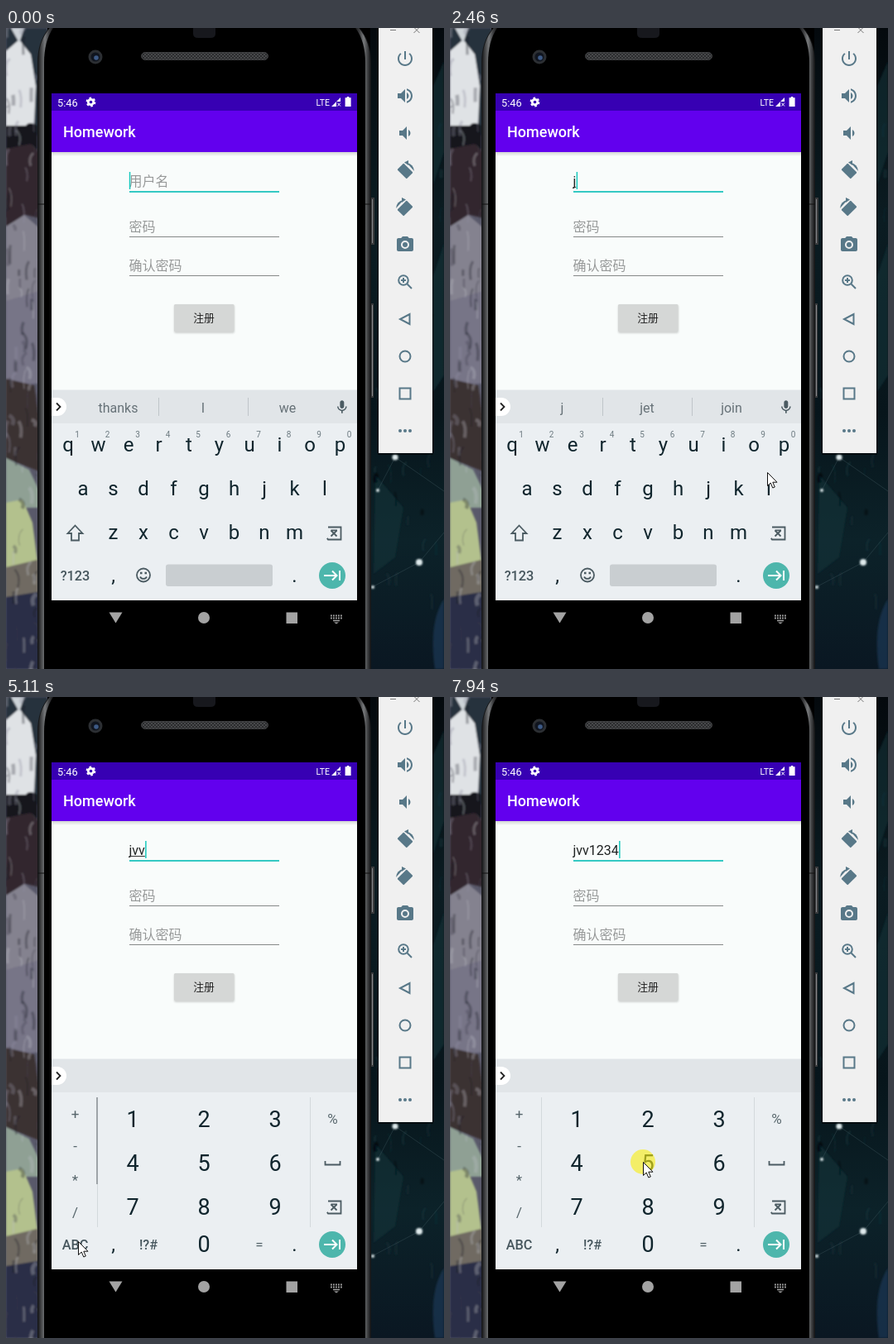
Write an HTML page that moves like this. It is 529 px wide and 775 px high and loops after 8000 ms.

```html
<!DOCTYPE html>
<html lang="zh">
<head>
<meta charset="utf-8">
<title>Homework</title>
<style>
html, body { margin: 0; width: 100%; height: 100%; overflow: hidden; background: #000; }
svg { display: block; }
text { font-family: Roboto, "Noto Sans CJK SC", "Noto Sans CJK", sans-serif; }
.mid text, text.mid { text-anchor: middle; }
.hint { font-size: 16px; fill: #979999; }
.key { font-size: 24px; fill: #10252d; }
.num { font-size: 27px; fill: #10252d; }
.sup { font-size: 10px; fill: #6c7a80; }
.mod { font-size: 16.3px; font-weight: 500; fill: #46565d; }
.sym { font-size: 17px; fill: #56656b; }
.sug { font-size: 16px; fill: #667177; }
.line { fill: none; stroke: #4b5b62; stroke-width: 1.8; }
.tool { fill: #587888; }
.tool .o { fill: none; stroke: #587888; stroke-width: 2; }
</style>
</head>
<body>
<svg width="529" height="775" viewBox="0 0 529 775">
  <defs>
    <linearGradient id="rim">
      <stop offset="0" stop-color="#1b1c1e"/><stop offset=".4" stop-color="#77797b"/>
      <stop offset=".65" stop-color="#3c3d3f"/><stop offset="1" stop-color="#0b0b0c"/>
    </linearGradient>
    <linearGradient id="night" x2="0" y2="1">
      <stop offset="0" stop-color="#04090d"/><stop offset=".3" stop-color="#0b1c22"/>
      <stop offset=".6" stop-color="#07151b"/><stop offset=".8" stop-color="#0c2229"/>
      <stop offset="1" stop-color="#0a1722"/>
    </linearGradient>
    <linearGradient id="fade" x2="0" y2="1">
      <stop offset="0" stop-opacity=".16"/><stop offset="1" stop-opacity="0"/>
    </linearGradient>
    <pattern id="mesh" width="4" height="4" patternUnits="userSpaceOnUse">
      <path fill="#2b2c2e" d="M0 0h4v4H0z"/><path stroke="#48494b" d="M0 0 4 4M4 0 0 4"/>
    </pattern>
    <filter id="soft"><feGaussianBlur stdDeviation="1"/></filter>
    <clipPath id="leftClip"><path d="M0 0h50v775H0z"/></clipPath>
    <clipPath id="screenClip"><path d="M55 79h369v613H55z"/></clipPath>
    <g id="erase">
      <path class="line" d="M-5-7.5H10.5V7.5H-5L-10.5 0ZM-1.5-3.7 6-3.7" stroke-dasharray="48"/>
      <path class="line" d="M-1.5-3.5 5.5 3.5M5.5-3.5-1.5 3.5"/>
    </g>
    <g id="enter">
      <circle r="16" fill="#4db6ac"/>
      <path fill="none" stroke="#fff" stroke-width="2" d="M-10 0H5M0-5.5 5.5 0 0 5.5M9-6V6"/>
    </g>
    <g id="turn">
      <rect class="o" x="-5.5" y="-8" width="11" height="16" rx="1" transform="rotate(-45)"/>
      <path class="o" d="M2-10A10.5 10.5 0 0 1 11 0" stroke-width="1.7"/>
      <path d="M-1-10.500 4-13V-7Z"/>
    </g>
  </defs>

  <!-- wallpaper -->
  <g clip-path="url(#leftClip)">
    <path fill="#59596a" d="M0 0h50v775H0z"/>
    <g id="paint" filter="url(#soft)">
      <path fill="#26303c" d="M0 0H50V130H0Z"/>
      <path fill="#dfe2e5" d="M0 28 16 14 30 32 36 70 34 118 0 122Z"/>
      <path fill="#cdd3d8" d="M6 0H22L16 18Z"/>
      <path fill="#15171d" d="M0 118H24Q28 112 38 118V150L20 165 0 150Z"/>
      <path fill="#33262d" d="M0 146 30 140 50 160V232L24 226 0 240Z"/>
      <path fill="#84828f" d="M0 240 22 226 50 250V335L0 330Z"/>
      <path fill="#777487" d="M0 330 40 318 50 430H0Z"/>
      <path fill="#3b3031" d="M0 424 34 432 50 540 0 520Z"/>
      <path fill="#8fa094" d="M0 520 28 534 50 580H0Z"/>
      <path fill="#b3c18d" d="M0 574 20 570 32 598 38 645 0 655Z"/>
      <path fill="#706a62" d="M0 652 50 640V696H0Z"/>
      <path fill="#2b2e46" d="M0 688 50 680V775H0Z"/>
    </g>
  </g>
  <path fill="url(#night)" d="M440 0h89v775h-89z"/>
  <g id="sky" filter="url(#soft)">
    <path fill="#12343b" opacity=".55" d="M516 70 529 40V150L516 190ZM516 300 529 260V420L516 440ZM446 540 480 580 470 640 444 660Z"/>
    <path fill="#1c3550" opacity=".8" d="M529 690Q510 720 518 775H529Z"/>
  </g>
  <path fill="none" stroke="#3c555c" stroke-width=".7" opacity=".6" d="M449 559 470 519 529 560M444 675 499 646 529 610"/>
  <g fill="#dfeaec" filter="url(#soft)">
    <circle cx="470" cy="519" r="3.600"/><circle cx="499" cy="646" r="4"/>
    <circle cx="449" cy="559" r="2"/><circle cx="443" cy="676" r="2"/>
  </g>

  <!-- phone -->
  <path fill="#393a3c" d="M440 205h5v57h-5zM440 333h4v114h-4z"/>
  <path stroke="#85878a" d="M442.500 207v53M442.500 335v110"/>
  <path fill="#161718" d="M38 775V42Q38 16 52 0H427Q441 16 441 42V775Z"/>
  <path fill="url(#rim)" d="M39 775V42Q39 16 53 0h6Q47 16 47 42V775Z"/>
  <path fill="url(#rim)" transform="matrix(-1 0 0 1 479 0)" d="M39 775V42Q39 16 53 0h6Q47 16 47 42V775Z"/>
  <path fill="#000" d="M46 775V42Q46 16 57 0H422Q434 16 434 42V775Z"/>
  <path stroke="#111" d="M38 213h8M434 213h7"/>
  <path fill="#17181d" d="M226 0h27v7q0 5-6 5h-15q-6 0-6-5Z"/>
  <circle cx="108" cy="35" r="8.500" fill="#2c2f33"/>
  <circle cx="108" cy="35" r="5.500" fill="#10151f"/>
  <circle cx="109" cy="36" r="2.800" fill="#3d5a86"/>
  <rect x="163.500" y="29.500" width="153" height="9" rx="4.500" fill="url(#mesh)" stroke="#3d3e40"/>

  <!-- app -->
  <g clip-path="url(#screenClip)">
    <path fill="#f9fcfb" d="M55 79h369v613H55z"/>
    <path fill="#3700b3" d="M55 79h369v21H55z"/>
    <path fill="#6200ee" d="M55 100h369v50H55z"/>
    <path fill="url(#fade)" d="M55 150h369v5H55z"/>
    <g fill="#fff">
      <text x="62" y="94.500" font-size="12.800">5:46</text>
      <text x="374.500" y="93.500" font-size="10.500">LTE</text>
      <text x="69" y="132" font-size="18" font-weight="500">Homework</text>
      <path d="M411.800 83h2.500v1.300h2.300V95h-7V84.300h2.200zM404 84V95H393Z"/>
      <path d="M399 89h6v6h-6z" fill="#3700b3"/>
      <path d="M400.300 90.500 404 94.500M404 90.500 400.300 94.500" stroke="#fff"/>
    </g>
    <g transform="translate(102.500 89.500)" fill="none" stroke="#fff">
      <circle r="3.200" stroke-width="2.700"/>
      <circle r="5" stroke-width="1.800" stroke-dasharray="2.618"/>
    </g>

    <text id="hint" class="hint" x="148.500" y="191">用户名</text>
    <text id="typed" x="148.500" y="190.500" font-size="16" fill="#202323"></text>
    <path id="under" stroke="#333" stroke-width="1"/>
    <rect id="caret" y="174" width="1.500" height="21" fill="#17c9bd"/>
    <path fill="#35c9c3" d="M149 197h181v2H149z"/>
    <text class="hint" x="148.500" y="245.500">密码</text>
    <text class="hint" x="148.500" y="293">确认密码</text>
    <path stroke="#858888" d="M149 252.500H330M149 299.500H330"/>
    <rect x="203" y="335" width="73" height="34" rx="2" opacity=".16" filter="url(#soft)"/>
    <rect x="203" y="334" width="72.500" height="33" rx="1.500" fill="#d5d7d6"/>
    <text class="mid" x="239" y="355" font-size="12.800" fill="#222">注册</text>

    <path fill="#e1e5e8" d="M55 438h369v40H55z"/>
    <path fill="#eef1f2" d="M55 437h369v1H55z"/>
    <path fill="#ebeff2" d="M55 478h369v214H55z"/>
    <path fill="#fff" d="M55 447h7a11 11 0 0 1 0 22h-7z"/>
    <path fill="none" stroke="#222" stroke-width="1.800" d="M61 453.500 65.500 458 61 462.500"/>
    <g id="sugs" class="mid"></g>
    <path id="bars" stroke="#bfc5c9" d="M184.500 447v22M292.500 447v22"/>

    <g id="letters" class="mid">
      <path fill="#4b5b62" transform="translate(396 448.500) scale(.82)" d="M12 14c1.660 0 3-1.340 3-3V5c0-1.660-1.340-3-3-3S9 3.340 9 5v6c0 1.660 1.340 3 3 3zm5.300-3c0 3-2.540 5.100-5.300 5.100S6.700 14 6.700 11H5c0 3.410 2.720 6.230 6 6.720V21h2v-3.280c3.280-.48 6-3.300 6-6.720h-1.700z"/>
      <path class="line" d="M83.500 601.500 92.500 611H88V619.500H79V611H74.500Z"/>
      <use href="#erase" x="394" y="611"/>
      <g class="line" transform="translate(166 661.500)" stroke-width="1.600">
        <circle r="8"/><path d="M-4 2A4.500 4.500 0 0 0 4 2"/>
        <path d="M-4-2.500h2.500M1.500-2.500H4" stroke-width="2.500"/>
      </g>
      <rect x="193" y="648.500" width="129" height="26.500" rx="3" fill="#c9ced1"/>
    </g>
    <g id="digits" class="mid">
      <rect id="press" width="86" height="52" fill="#d6dce0"/>
      <path stroke="#d3d9dc" d="M110.500 484V641M367.500 484V641"/>
      <path id="scroll" fill="#9ea4a8" d="M109 484h2v105h-2z"/>
      <path class="line" d="M385.500 561v4.500H403.500V561"/>
      <use href="#erase" x="394" y="617"/>
    </g>
    <use href="#enter" x="394" y="662"/>
  </g>

  <g fill="#a3a3a3">
    <path d="M124.500 706.500H140.500L132.500 719.500Z"/><circle cx="239" cy="713" r="7"/>
    <path d="M338.500 706.500h13.500v13.500h-13.500z"/>
    <path d="M396 718.500h6l-3 2z"/>
  </g>
  <path stroke="#a3a3a3" stroke-width="1.800" stroke-dasharray="1.800 1.200" d="M392 710.500h14M392 713.500h14"/>
  <path stroke="#a3a3a3" stroke-width="1.500" d="M395 716.500h8"/>

  <!-- emulator tools -->
  <path fill="#000" opacity=".5" d="M449 0h67v516h-67z"/>
  <path fill="#f0f0f0" d="M450 0h65v514h-65z"/>
  <path fill="none" stroke="#777" d="M464 2.500h7M492.500-1 499.500 6M499.500-1 492.500 6"/>
  <g class="tool" transform="translate(482 0)">
    <path transform="translate(-12 25)" d="M13 3h-2v10h2V3zm4.830 2.170l-1.420 1.420C17.990 7.860 19 9.810 19 12c0 3.870-3.130 7-7 7s-7-3.130-7-7c0-2.190 1.010-4.140 2.580-5.420L6.170 5.170C4.230 6.820 3 9.260 3 12c0 4.970 4.030 9 9 9s9-4.030 9-9c0-2.740-1.230-5.180-3.170-6.830z"/>
    <path transform="translate(-12 70)" d="M3 9v6h4l5 5V4L7 9H3zm13.500 3c0-1.770-1.020-3.290-2.500-4.030v8.050c1.480-.73 2.500-2.250 2.500-4.020zM14 3.230v2.060c2.890.86 5 3.540 5 6.710s-2.110 5.850-5 6.710v2.060c4.010-.91 7-4.490 7-8.770s-2.990-7.860-7-8.770z"/>
    <path transform="translate(-12 115)" d="M18.500 12c0-1.770-1.020-3.290-2.500-4.030v8.050c1.480-.73 2.500-2.250 2.500-4.020zM5 9v6h4l5 5V4L9 9H5z"/>
    <use href="#turn" y="173"/>
    <use href="#turn" y="218" transform="scale(-1 1)"/>
    <path transform="translate(-12 250)" fill-rule="evenodd" d="M9 2L7.170 4H4c-1.100 0-2 .9-2 2v12c0 1.100.9 2 2 2h16c1.100 0 2-.9 2-2V6c0-1.100-.9-2-2-2h-3.170L15 2H9zm3 15a5 5 0 0 1 0-10 5 5 0 0 1 0 10z"/>
    <circle cy="262" r="3"/>
    <circle class="o" cx="-2" cy="305" r="5.800"/>
    <path class="o" d="M2.500 309.500 8 315"/>
    <path class="o" stroke-width="1.300" d="M-5 305H1M-2 302V308"/>
    <path class="o" stroke-width="1.700" d="M5.500 346V358L-6 352Z"/>
    <circle class="o" cy="397" r="6.500"/>
    <path class="o" d="M-6.500 435.500h13v13h-13z"/>
    <circle cx="-6" cy="487" r="2"/><circle cy="487" r="2"/><circle cx="6" cy="487" r="2"/>
  </g>

  <g id="mouse">
    <circle id="click" r="15" fill="#f8ee14" opacity=".62"/>
    <path fill="#fff" stroke="#111" d="M.5.500V16.500L4.200 13 6.800 19 9.300 18 6.800 12.200H12Z"/>
  </g>
</svg>
<script>
const $ = id => document.getElementById(id);
const LOOP = 8000;

function add(parent, tag, attrs, text) {
  const el = document.createElementNS('http://www.w3.org/2000/svg', tag);
  for (const k in attrs) el.setAttribute(k, attrs[k]);
  if (text) el.textContent = text;
  return parent.appendChild(el);
}
const label = (parent, cls, x, y, text) => add(parent, 'text', { class: cls, x, y }, text);

// brush strokes on the wallpaper
let seed = 11;
const rnd = () => (seed = seed * 16807 % 2147483647) / 2147483647;
function strokes(box, n, x, w, tones, opacity) {
  for (let i = 0; i < n; i++) {
    const y = rnd() * 775, dx = rnd() * 16 - 8, dy = 6 + rnd() * 18;
    add($(box), 'path', {
      d: `M${x + rnd() * w} ${y}q${dx} ${dy / 3} ${dx / 2} ${dy}`, fill: 'none', opacity,
      stroke: tones[Math.floor(rnd() * tones.length)], 'stroke-width': 1 + rnd() * 4
    });
  }
}
strokes('paint', 90, 0, 42, ['#1d2029', '#8f90a0', '#43414c', '#b9bdc2'], .35);
strokes('sky', 40, 444, 84, ['#143038', '#02070a', '#1b3c44'], .4);

// keyboards
const STEP = 36.5, letters = $('letters'), digits = $('digits');
[['qwertyuiop', 75, 512], ['asdfghjkl', 93, 565], ['zxcvbnm', 129.5, 618]].forEach(([row, x, y], r) =>
  [...row].forEach((c, i) => {
    label(letters, 'key', x + i * STEP, y, c);
    if (!r) label(letters, 'sup', x + 11 + i * STEP, 494.5, (i + 1) % 10);
    if (!r && i === 9) label(letters, 'sup', x + 11 + i * STEP, 494.5, '0');
  }));
label(letters, 'mod', 83.5, 667.5, '?123');
for (let n = 0; n < 9; n++)
  label(digits, 'num', 153 + n % 3 * 86, 520 + Math.floor(n / 3) * 53, String(n + 1));
label(digits, 'num', 239, 671, '0');
['+', '-', '*', '/'].forEach((c, i) => label(digits, 'sym', 83.5, [510, 549, 590, 629][i], c));
label(digits, 'sym', 394.5, 516, '%');
label(digits, 'mod', 83.5, 667.5, 'ABC');
label(digits, 'mod', 172, 667.5, '!?#');
label(digits, 'sym', 306, 668, '=');
for (const kb of [letters, digits]) {
  label(kb, 'key', 129.5, 670, ',');
  label(kb, 'key', 348.5, 670, '.');
}
const slots = [135.5, 238, 340].map(x => label($('sugs'), 'sug', x, 464.5, ' '));

// timeline
const DIGITS_AT = 5100;
const typing = [
  [0, '', ['thanks', 'I', 'we']],
  [2300, 'j', ['j', 'jet', 'join']],
  [3540, 'jv', ['jv', 'via', 'JV']],
  [3960, 'jvv', ['', 'jvv', '']],
  [5980, 'jvv1'], [6500, 'jvv12'], [6970, 'jvv123'], [7550, 'jvv1234']
];
const clicks = [[2100, 2290], [3430, 3540], [3800, 3960], [4700, 4785],
  [5840, 5975], [6400, 6495], [6850, 6960], [7440, 7540], [7880, LOOP]];
const presses = [[5980, 0, 0], [6500, 1, 0], [6970, 2, 0], [7550, 0, 1]];
const path = [[0, 432, 790], [170, 432, 780], [900, 184, 194], [1070, 182, 192], [1180, 182, 192],
  [1690, 317, 492], [2000, 383, 535], [2080, 386, 536], [2450, 386, 536], [2840, 280, 571],
  [3240, 166, 608], [3320, 165, 619], [4020, 165, 619], [4170, 139, 621], [4520, 87, 658],
  [5180, 87, 658], [5750, 153, 513], [6020, 153, 514], [6290, 242, 513], [6530, 242, 513],
  [6800, 328, 514], [7000, 328, 514], [7380, 152, 562], [7600, 152, 562], [7850, 232.5, 562], [LOOP, 232.5, 562]];

const last = (list, t) => list.filter(e => e[0] <= t).pop();
const show = (el, on) => el.setAttribute('visibility', on ? 'inherit' : 'hidden');

function mouseAt(t) {
  const i = Math.max(1, path.findIndex(p => p[0] > t));
  const [t0, x0, y0] = path[i - 1], [t1, x1, y1] = path[i];
  const k = (t - t0) / (t1 - t0);
  return [x0 + (x1 - x0) * k, y0 + (y1 - y0) * k];
}

let shown;
function render(t) {
  const now = last(typing, t), [since, text, words] = now;
  const numeric = t >= DIGITS_AT;
  if (shown !== now) {
    shown = now;
    $('typed').textContent = text;
    const end = 148.5 + (text ? $('typed').getComputedTextLength() : 0);
    $('caret').setAttribute('x', end + .3);
    $('under').setAttribute('d', `M149 192.500H${end}`);
    show($('hint'), !text);
    show($('under'), text && text.length < 5);
    slots.forEach((s, i) => s.textContent = words ? words[i] : '');
  }
  // the caret restarts its blink with every key
  const phase = since ? t - since : t + 290;
  show($('caret'), phase % 1000 < 500);
  show($('sugs'), !numeric);
  show($('bars'), t < 3960);
  show(letters, !numeric);
  show(digits, numeric);
  $('scroll').setAttribute('opacity', Math.min(1, Math.max(0, (6900 - t) / 250)));

  const key = presses.find(p => t >= p[0] - 20 && t < p[0] + 60);
  show($('press'), numeric && key);
  if (key) {
    $('press').setAttribute('x', 111 + key[1] * 85.5);
    $('press').setAttribute('y', 484 + key[2] * 53);
  }
  $('mouse').setAttribute('transform', `translate(${mouseAt(t).map(Math.round)})`);
  show($('click'), clicks.some(([a, b]) => t >= a && t < b));
}

let start;
function tick(ts) {
  start ??= ts;
  render((ts - start) % LOOP);
  requestAnimationFrame(tick);
}
render(0);
requestAnimationFrame(tick);
</script>
</body>
</html>
```
